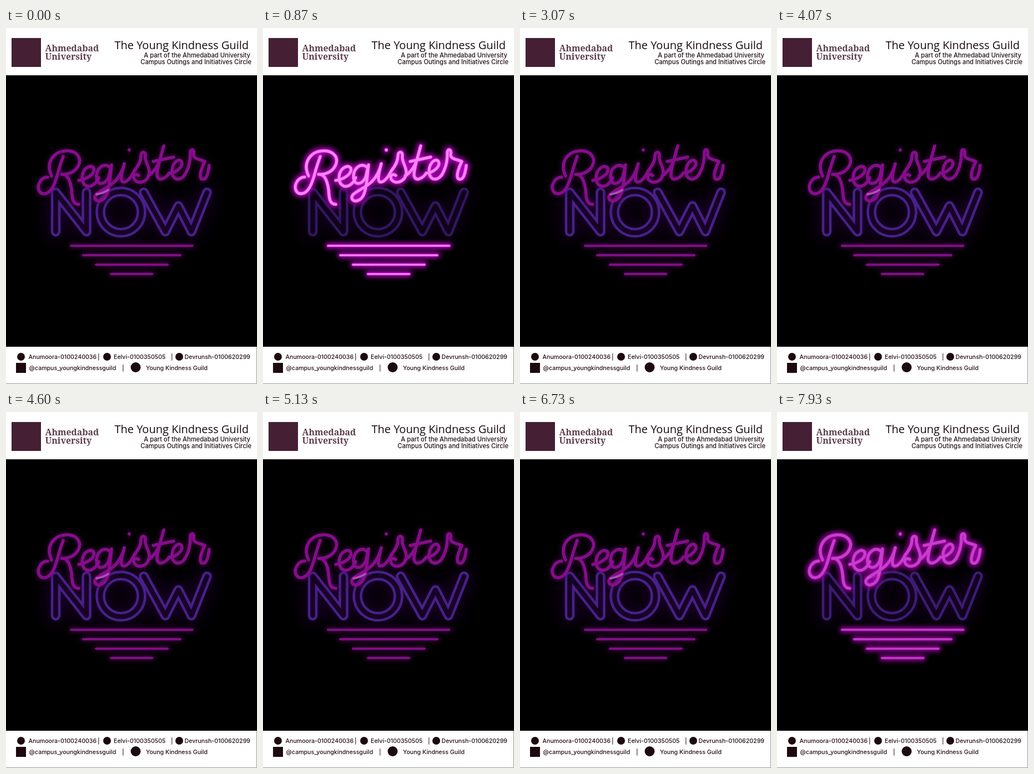
An HTML page for the animation above (7990 ms loop, 452x640 px).

```html
<!DOCTYPE html>
<html lang="en">
<head>
<meta charset="utf-8">
<title>Register now</title>
<style>
  html, body { margin: 0; width: 100%; height: 100%; overflow: hidden; background: #fff; }
  svg { display: block; width: 452px; height: 640px; }
  text { font: 500 10.6px Inter, sans-serif; fill: #240f14; }
  .title { font: 400 20px "Open Sans", sans-serif; fill: #1c0a0e; }
  .sub { font-size: 11.2px; }
  .school { font: 700 15.8px "Noto Serif", serif; fill: #5d3d4c; }
  .end { text-anchor: end; }
  .neon { fill: none; stroke-linecap: round; stroke-linejoin: round; }
</style>
</head>
<body>
<svg viewBox="0 0 452 640">
  <defs>
    <filter id="edge" filterUnits="userSpaceOnUse" x="0" y="150" width="452" height="350"><feGaussianBlur stdDeviation=".6"/></filter>
    <filter id="soft" filterUnits="userSpaceOnUse" x="0" y="150" width="452" height="350"><feGaussianBlur stdDeviation="4.5"/></filter>
    <filter id="wide" filterUnits="userSpaceOnUse" x="0" y="150" width="452" height="350"><feGaussianBlur stdDeviation="14"/></filter>

    <g id="script">
      <path d="M75 268C60 268 52 290 64 297C82 303 90 275 95 255Q99 242 103 231"/>
      <path d="M82 266C70 240 88 222 106 221C126 219 138 233 130 248C124 260 110 264 100 263C112 262 116 276 118 290C119 306 120 317 131 317"/>
      <path d="M131 274C146 272 161 262 158 252C153 244 138 252 137 268C137 284 148 288 157 282Q164 277 167 269"/>
      <path d="M188 251C177 240 163 252 163 267C163 283 177 284 185 268L190 246C188 265 187 285 182 298C177 312 161 315 160 305C159 296 180 291 196 276"/>
      <path d="M196 276C204 268 210 256 213 244C208 262 205 277 212 277C220 276 226 267 231 257"/>
      <path d="M222 219v.5"/>
      <path d="M231 257C238 248 243 240 243 230C243 221 252 221 251 230C249 240 259 249 258 261C256 277 238 282 231 272C228 265 234 261 239 265"/>
      <path d="M256 266Q268 258 275 243M284 212C278 235 271 255 272 265C274 277 287 271 294 261M265 240L302 232"/>
      <path d="M294 261C308 260 320 248 316 240C311 233 300 242 299 256C299 274 313 276 322 264"/>
      <path d="M322 264C328 254 332 240 332 226C331 216 340 217 338 226C336 236 350 236 358 240C352 252 345 272 355 272C361 272 364 262 366 247"/>
    </g>
    <path id="bars" d="M117 391.500H335.500M139 408.500H314M162 425.500H291M189 442.300H263.500"/>
    <path id="now" d="M89.500 366V295.500L145 366V295.500M244 331a37 37 0 1 1-74 0a37 37 0 1 1 74 0M248 295.500L287 366L310.500 320L334 366L362 295.500"/>
    <mask id="tube" maskUnits="userSpaceOnUse" x="60" y="270" width="330" height="120">
      <g class="neon">
        <use href="#now" stroke="#fff" stroke-width="17.500"/>
        <use href="#now" stroke="#000" stroke-width="8.500"/>
      </g>
    </mask>
  </defs>

  <rect width="452" height="640" fill="#fff"/>
  <rect x="10" y="18" width="53" height="52" fill="#452034"/>
  <text class="school" x="70.500" y="41.500">Ahmedabad</text>
  <text class="school" x="70.500" y="57">University</text>
  <text class="title end" x="437" y="38">The Young Kindness Guild</text>
  <text class="sub end" x="440" y="53">A part of the Ahmedabad University</text>
  <text class="sub end" x="442" y="65">Campus Outings and Initiatives Circle</text>

  <rect y="85" width="452" height="488" fill="#000"/>
  <path d="M451.500 573V639.500H0" fill="none" stroke="#999"/>
  <g id="purple" class="neon">
    <use href="#now" stroke="#25053a" stroke-width="34" filter="url(#wide)" opacity=".5"/>
    <use href="#now" stroke="#2a0848" stroke-width="18" filter="url(#soft)" opacity=".25"/>
    <g filter="url(#edge)">
      <rect x="60" y="270" width="330" height="120" fill="#48208a" mask="url(#tube)"/>
    </g>
  </g>
  <g class="neon" stroke="#870c8c">
    <g stroke="#55075c" stroke-width="10" filter="url(#soft)" opacity=".5">
      <use href="#script"/><use href="#bars"/>
    </g>
    <g filter="url(#edge)">
      <use href="#script" stroke-width="5.600"/>
      <use href="#bars" stroke-width="4"/>
      <path d="M163 299Q176 297 184 291" stroke="#b04fb6" stroke-width="4"/>
    </g>
  </g>
  <g id="halo" class="neon" opacity="0" stroke="#a800b4" stroke-width="12">
    <g filter="url(#soft)">
      <use href="#script"/><use href="#bars" stroke-width="9"/>
    </g>
  </g>
  <g id="core" class="neon" opacity="0">
    <g stroke="#d42bd8">
      <use href="#script" stroke-width="6.500"/><use href="#bars" stroke-width="5"/>
    </g>
    <g stroke="#fb86f8">
      <use href="#script" stroke-width="4.600"/><use href="#bars" stroke-width="2.600"/>
    </g>
  </g>

  <g fill="#1d0a0f">
    <circle cx="27" cy="591" r="7"/>
    <circle cx="182" cy="591" r="7"/>
    <circle cx="312" cy="591" r="7"/>
    <rect x="18" y="602" width="18" height="18"/>
    <circle cx="233.500" cy="610" r="9"/>
  </g>
  <text x="40.500" y="595">Anumoora-0100240036</text>
  <text x="165" y="595">|</text>
  <text x="194" y="595">Eelvi-0100350505</text>
  <text x="297" y="595">|</text>
  <text class="end" x="440" y="595">Devrunsh-0100620299</text>
  <text x="41.500" y="615">@campus_youngkindnessguild</text>
  <text x="209" y="615">|</text>
  <text x="252" y="615">Young Kindness Guild</text>
</svg>
<script>
  const LOOP = 7990, BEAT = 1000;
  // start within the beat, then the opacity of each layer
  const steps = [
    { at: 0, halo: 0, core: 0, purple: 1 },
    { at: 865, halo: 1, core: 1, purple: .7 },
    { at: 928, halo: .75, core: .45, purple: .85 },
    { at: 994, halo: 0, core: 0, purple: 1 },
  ];
  const layers = ['halo', 'core', 'purple'];
  const start = performance.now();

  function draw(now) {
    const phase = Math.max(0, now - start) % LOOP % BEAT;
    const step = steps.findLast(s => phase >= s.at);
    for (const id of layers) document.getElementById(id).setAttribute('opacity', step[id]);
    requestAnimationFrame(draw);
  }
  draw(start);
</script>
</body>
</html>
```
